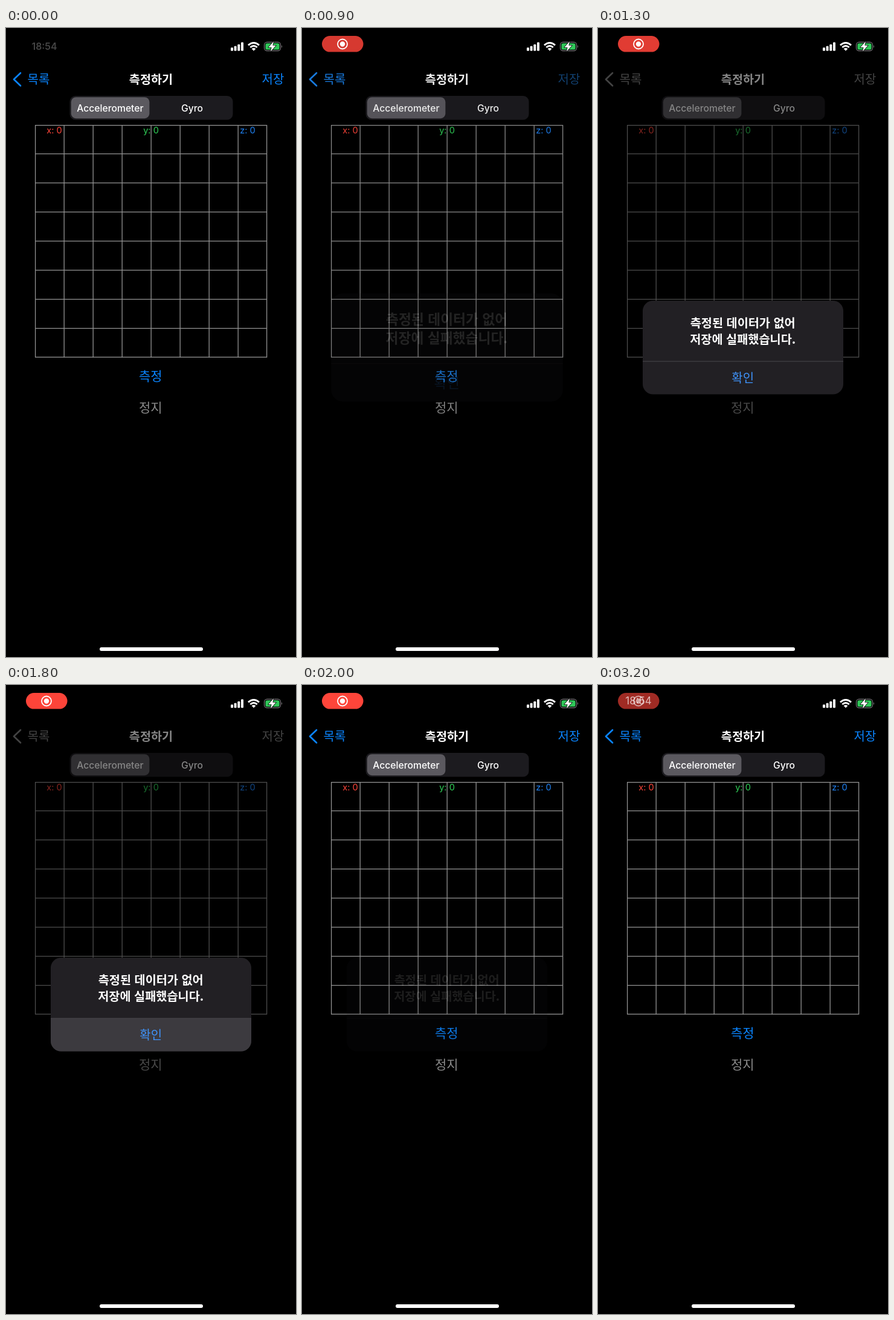
An HTML page for the animation above (3.3 s loop, 480x1038 px).

```html
<!DOCTYPE html>
<html lang="ko">
<head>
<meta charset="utf-8">
<title>측정하기</title>
<style>
  html, body { margin: 0; width: 100%; height: 100%; overflow: hidden; background: #000; }
  svg { display: block; width: 480px; height: 1038px; }
  text { font-family: "Noto Sans CJK KR", "Noto Sans CJK", sans-serif; font-size: 20px; text-anchor: middle; }
  .latin { font-family: Inter, Roboto, sans-serif; }
  .tab { font-size: 15.7px; font-weight: 500; fill: #fff; }
  .axis { font-size: 14.6px; }
  .tint { fill: #0a84ff; }
  .large { font-size: 21px; }
  .bold { font-size: 19.7px; font-weight: 700; fill: #fff; }
</style>
</head>
<body>
<svg viewBox="0 0 480 1038">
  <rect width="480" height="1038"/>

  <g id="app">
    <path id="chevron" d="M24 74.3 L13 84.7 L24 95.2" fill="none" stroke="#0a84ff" stroke-width="2.7" stroke-linecap="round" stroke-linejoin="round"/>
    <text class="tint" x="54" y="92">목록</text>
    <text class="bold" x="240" y="92">측정하기</text>
    <text id="save" x="442" y="92">저장</text>

    <rect x="105.5" y="112" width="270" height="39.5" rx="9.5" fill="#1c1b1f"/>
    <rect x="107.8" y="114.2" width="129.6" height="35" rx="8" fill="#5b595f"/>
    <text class="latin tab" x="172.4" y="137.6">Accelerometer</text>
    <text class="latin tab" x="308" y="137.6">Gyro</text>

    <g fill="none" stroke="#929292" stroke-width="1.3">
      <rect x="48.6" y="160.6" width="383" height="382.6"/>
      <path id="grid"/>
    </g>
    <text class="latin axis" x="80" y="174.3" fill="#ff453a">x: 0</text>
    <text class="latin axis" x="240" y="174.3" fill="#30d158">y: 0</text>
    <text class="latin axis" x="400" y="174.3" fill="#1f82f5">z: 0</text>

    <text class="tint large" x="239.3" y="582">측정</text>
    <text class="large" x="239.3" y="634" fill="#8a8a8a">정지</text>
  </g>

  <rect id="dim" width="480" height="1038"/>

  <g id="alert">
    <clipPath id="card"><rect x="74" y="450" width="332" height="154.5" rx="17"/></clipPath>
    <g clip-path="url(#card)">
      <rect x="74" y="450" width="332" height="155" fill="#222024"/>
      <rect id="press" x="74" y="550" width="332" height="55" fill="#3c3a3f"/>
      <rect x="74" y="549.6" width="332" height="1" fill="#4a484d"/>
    </g>
    <text class="bold" x="239.7" y="494">측정된 데이터가 없어</text>
    <text class="bold" x="239.7" y="521">저장에 실패했습니다.</text>
    <text id="confirm" x="239.7" y="585" fill="#3f93fb">확인</text>
  </g>

  <g id="pill">
    <rect id="capsule" x="33" y="13" width="68.5" height="26.6" rx="13.3" fill="#ff453a"/>
    <g id="record" fill="#fff">
      <circle cx="67" cy="26.5" r="8" fill="none" stroke="#fff" stroke-width="1.8"/>
      <circle cx="67" cy="26.5" r="4.2"/>
    </g>
  </g>
  <text id="clock" class="latin" fill="#fff">18:54</text>

  <g fill="#fff">
    <rect x="372" y="32.3" width="4" height="5.4" rx="1.2"/>
    <rect x="377.6" y="29.8" width="4" height="7.9" rx="1.2"/>
    <rect x="383.3" y="27" width="4" height="10.7" rx="1.2"/>
    <rect x="389" y="23.5" width="4" height="14.2" rx="1.2"/>
    <path d="M410 37.8 L406.6 34.3 Q410 31.6 413.4 34.3 Z"/>
    <g fill="none" stroke="#fff" stroke-width="2.9">
      <path d="M404.3 32 Q410 26.9 415.7 32"/>
      <path d="M401 28.4 Q410 20.6 419 28.4"/>
    </g>
    <rect x="155" y="1022" width="171" height="6" rx="3"/>
  </g>
  <rect x="427.5" y="23.3" width="27" height="14.4" rx="4.6" fill="none" stroke="#747476" stroke-width="1.2"/>
  <rect x="429.4" y="25.2" width="23.2" height="10.6" rx="2.9" fill="#30c759"/>
  <path d="M456 28.2 Q458.2 30.5 456 32.8 Z" fill="#747476"/>
  <path d="M443 22 L434.3 32 H439.6 L437.8 39 L446.8 28.8 H441.4 Z" fill="#fff" stroke="#000" stroke-width="1.5" stroke-linejoin="round" paint-order="stroke"/>
</svg>

<script>
const LOOP = 3300, STEP = 100;
const SAVE_TAP = 800, OPEN = 880, CONFIRM_TAP = 1700, CLOSE = 1840, STOP = 3050;
const BLUE = [10, 132, 255], GREY = [128, 128, 128];

const get = id => document.getElementById(id);
const tinted = document.querySelectorAll("text.tint");
const ramp = (t, from, to) => Math.min(1, Math.max(0, (t - from) / (to - from)));
const easeOut = p => 1 - (1 - p) ** 3;
const fadeColor = p => `rgb(${BLUE.map((v, i) => Math.round(v + (GREY[i] - v) * Math.min(1, p)))})`;

function buildGrid() {
  let d = "";
  for (let i = 1; i < 8; i++) {
    d += `M${48.2 + 48 * i} 160.6v382.6M48.6 ${159.7 + 48 * i}h383`;
  }
  get("grid").setAttribute("d", d);
}

function drawDialog(t) {
  const opened = easeOut(ramp(t, OPEN, 1300));
  const closed = easeOut(ramp(t, CLOSE, 2150));
  const staying = 1 - ramp(t, CLOSE, 2000);
  const dim = opened * staying;
  const scale = 1 + .18 * (1 - opened);

  tinted.forEach(el => el.style.fill = fadeColor(dim));
  get("chevron").style.stroke = fadeColor(dim);
  get("save").style.fill = fadeColor(dim * 1.6);
  get("save").style.opacity = t < SAVE_TAP ? 1 : .35 + .65 * ramp(t, SAVE_TAP, 1200);
  get("dim").style.opacity = .48 * dim;
  get("press").style.opacity = t < CONFIRM_TAP ? 0 : staying;
  get("confirm").style.opacity = staying;
  get("alert").style.opacity = opened * (1 - closed);
  get("alert").setAttribute("transform", `translate(240 527.2) scale(${scale}) translate(-240 -527.2)`);
}

function drawStatus(t) {
  const shown = easeOut(ramp(t, 0, 250));
  const leaving = ramp(t, STOP, 3270);
  const breath = .92 + .08 * Math.cos((t - 1950) / 1000 * Math.PI);
  get("capsule").style.opacity = breath * (1 - .4 * leaving);
  get("record").style.opacity = 1 - .65 * leaving;
  get("pill").style.opacity = shown;

  // The clock returns over the pill, then settles lower and fades.
  const clock = get("clock"), returning = t > STOP;
  clock.setAttribute("x", returning ? 67 : 63.5);
  clock.setAttribute("y", returning ? 32.4 : 36.4);
  clock.style.fontSize = returning ? "17px" : "15.8px";
  clock.style.fontWeight = returning ? 400 : 600;
  clock.style.opacity = returning ? leaving : .27 * (1 - ramp(t, 0, STEP));
}

function render(now) {
  const t = Math.floor(Math.max(0, now - start) % LOOP / STEP) * STEP;
  drawDialog(t);
  drawStatus(t);
  requestAnimationFrame(render);
}

buildGrid();
const start = performance.now();
render(start);
</script>
</body>
</html>
```
